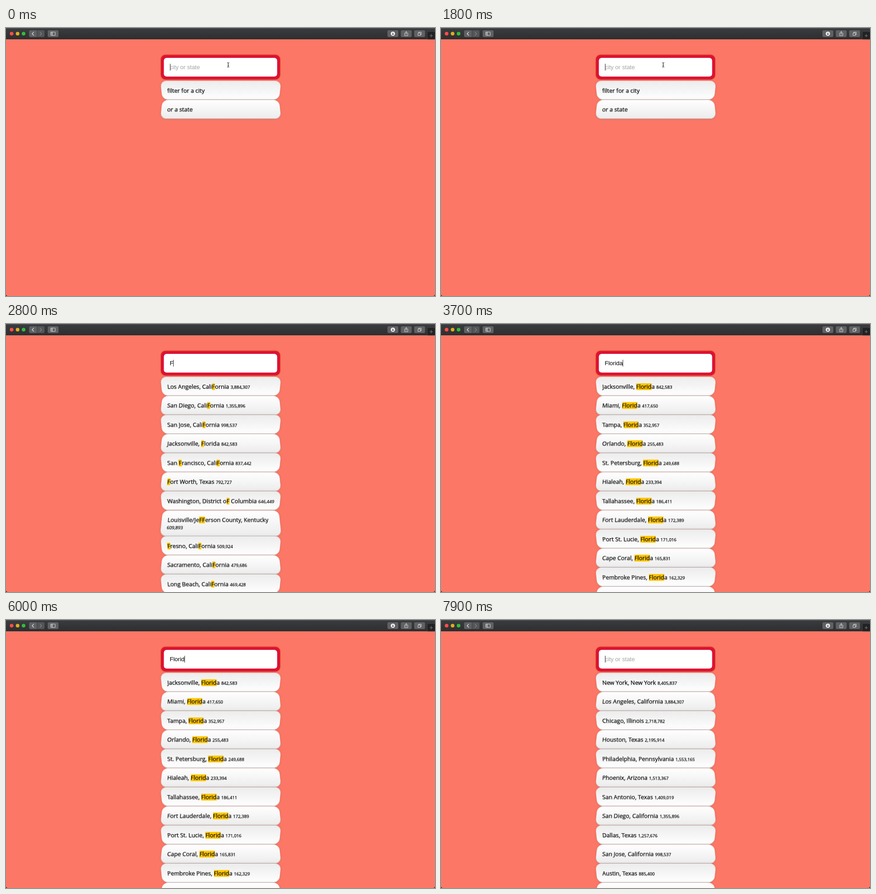
These frames come from a looping animation (947x592 px, 8 s). An HTML page:

```html
<!DOCTYPE html>
<html lang="en">
<head>
<meta charset="utf-8">
<title>City filter</title>
<style>
  html, body { margin: 0; width: 100%; height: 100%; overflow: hidden; background: #000; }
  #stage { position: relative; width: 947px; height: 592px; overflow: hidden; background: #fc7766; border-radius: 0 0 4px 4px; }
  #bar, #mouse { position: absolute; left: 0; top: 0; z-index: 2; }
  #box { position: absolute; left: 0; top: 0; }
  #field {
    position: absolute; left: 348.5px; top: 66px; width: 250px; height: 41px;
    font: 13px/42px "Liberation Sans", Arial, sans-serif; white-space: pre;
  }
  #text { position: absolute; left: 13px; top: 0; }
  #text.empty { color: #a3a3a3; }
  #caret { position: absolute; top: 13px; width: 1px; height: 15px; background: #222; }
  #list { position: absolute; left: 342.6px; top: 115px; margin: 0; padding: 0; list-style: none; }
  #list li {
    position: absolute; left: 0; top: 0; width: 262px; box-sizing: border-box; padding: 13px;
    border-radius: 13px; font: 500 12.8px/16px "Open Sans", "Noto Sans", sans-serif;
    white-space: nowrap; color: #000; -webkit-text-stroke: .25px #000;
    box-shadow: inset 0 -.7px #999, 0 0 6px rgba(0, 0, 0, .1);
  }
  #list small { font-size: 9.6px; line-height: 1px; }
  #list mark { color: inherit; background: linear-gradient(#ffc600, #ffc600) center / 100% 15px no-repeat; }
</style>
</head>
<body>
<div id="stage">
  <svg id="bar" width="947" height="26" fill="none" stroke-linecap="round" stroke-linejoin="round">
    <defs>
      <linearGradient id="metal" x2="0" y2="1">
        <stop stop-color="#3b3c3f"/><stop offset="1" stop-color="#2d2e30"/>
      </linearGradient>
    </defs>
    <rect width="947" height="25" fill="url(#metal)"/>
    <rect width="947" height="1" fill="#5b5c5e"/>
    <circle cx="12.4" cy="12.6" r="4" fill="#fb4f49"/>
    <circle cx="25.6" cy="12.6" r="4" fill="#deae22"/>
    <circle cx="38.8" cy="12.6" r="4" fill="#2fbe3c"/>
    <g fill="#606163">
      <path d="M54 5H68V20H54a3 3 0 0 1-3-3V8a3 3 0 0 1 3-3Z"/>
      <path d="M68.7 5H82a3 3 0 0 1 3 3v9a3 3 0 0 1-3 3H68.7Z" fill="#545557"/>
      <rect x="92" y="5" width="24" height="15" rx="3"/>
      <rect x="842" y="5" width="24" height="15" rx="3"/>
      <rect x="871.5" y="5" width="24" height="15" rx="3"/>
      <rect x="901" y="5" width="24" height="15" rx="3"/>
    </g>
    <path d="M61 9.2L57.6 12.6L61 16" stroke="#f2f2f2" stroke-width="1.2"/>
    <path d="M75.2 9.2L78.6 12.6L75.2 16" stroke="#8b8c8e" stroke-width="1.1"/>
    <g stroke="#e4e4e4" stroke-width=".9">
      <rect x="98.8" y="9" width="10" height="7.4" rx=".8"/>
      <path d="M102.3 9V16.4M100.1 10.8h.9M100.1 12.4h.9M100.1 14h.9"/>
      <path d="M882 11.2H880V17H887V11.2H885M883.5 14V8M881.7 9.6L883.5 7.8L885.3 9.6"/>
      <path d="M911.2 9.2H916.6V14.4M911.2 9.2V11H909.4V16.4H914.8V14.4H916.6M911.2 11H914.8V14.4"/>
    </g>
    <circle cx="854" cy="12.6" r="4.7" fill="#f4f4f4"/>
    <path d="M854 10.2V14.6M852.3 13.1L854 14.9L855.7 13.1" stroke="#4b4c4e" stroke-width="1.1"/>
    <rect x="930.5" y="8" width="17" height="17" fill="#202123" stroke="#444547" stroke-width=".8"/>
    <path d="M935.5 17H942M938.7 13.7V20.3" stroke="#87888a" stroke-width=".9"/>
  </svg>
  <svg id="box" width="947" height="130">
    <rect id="ring" x="341.4" y="58.9" width="264.2" height="55.2" rx="10.5" fill="none" stroke="#e8622f" stroke-width="1.6"/>
    <rect x="342" y="59.5" width="263" height="54" rx="10" fill="#dc1235"/>
    <rect x="348.5" y="66" width="250" height="41.2" rx="6" fill="#fff"/>
  </svg>
  <div id="field"><span id="text"></span><i id="caret"></i></div>
  <ul id="list"></ul>
  <svg id="mouse" width="24" height="24" viewBox="-8 -8 24 24">
    <path id="arrow" d="M0 0V10L2.3 8L3.8 11.4L5.5 10.6L4 7.4H7Z" fill="#000" stroke="#fff" stroke-width=".9"/>
    <path id="beam" d="M-2.3 -5Q0 -5 0 -3.5Q0 -5 2.3 -5M0 -3.5V3.5M-2.3 5Q0 5 0 3.5Q0 5 2.3 5M-1.2 1H1.2" fill="none" stroke="#111" stroke-width="1"/>
  </svg>
</div>
<script>
const $ = id => document.getElementById(id);
const LOOP = 8000, LAG = 100, WORD = 'Florida';
const TYPE = 2650, ERASE = 5850;

const parse = (s, state = '') => s.split('; ').map(r => {
  const cut = r.lastIndexOf(' ');
  return [r.slice(0, cut) + state, r.slice(cut + 1)];
});
const all = parse('New York, New York 8,405,837; Los Angeles, California 3,884,307; Chicago, Illinois 2,718,782; ' +
  'Houston, Texas 2,195,914; Philadelphia, Pennsylvania 1,553,165; Phoenix, Arizona 1,513,367; ' +
  'San Antonio, Texas 1,409,019; San Diego, California 1,355,896; Dallas, Texas 1,257,676; ' +
  'San Jose, California 998,537; Austin, Texas 885,400; Indianapolis, Indiana 843,393');
const withF = parse('Los Angeles, California 3,884,307; San Diego, California 1,355,896; San Jose, California 998,537; ' +
  'Jacksonville, Florida 842,583; San Francisco, California 837,442; Fort Worth, Texas 792,727; ' +
  'Washington, District of Columbia 646,449; Louisville/Jefferson County, Kentucky 609,893; ' +
  'Fresno, California 509,924; Sacramento, California 479,686; Long Beach, California 469,428');
const florida = parse('Jacksonville 842,583; Miami 417,650; Tampa 352,957; Orlando 255,483; St. Petersburg 249,688; ' +
  'Hialeah 233,394; Tallahassee 186,411; Fort Lauderdale 172,389; Port St. Lucie 171,016; ' +
  'Cape Coral 165,831; Pembroke Pines 162,329; Hollywood 146,526', ', Florida');
const hints = [['filter for a city'], ['or a state']];

// number of letters in the field at time t
function typed(t) {
  if (t < TYPE) return 0;
  if (t < ERASE) return Math.min(7, 1 + Math.floor((t - TYPE) / 166));
  return Math.max(0, 6 - Math.floor((t - ERASE) / 280));
}

function rowsFor(t) {
  const n = typed(t - LAG);
  if (!n) return t < ERASE ? hints : all;
  return n === 1 ? withF : florida;
}

function drawList(rows, query) {
  let y = 0;
  $('list').innerHTML = rows.map(([name, count], i) => {
    const tall = name.length > 35, odd = i % 2 === 0, height = tall ? 57 : 42;
    const label = query ? name.replace(new RegExp(query, 'gi'), `<mark>${query}</mark>`) : name;
    const number = count ? `${tall ? '<br>' : ' '}<small>${count}</small>` : '';
    const style = `height:${height}px;` +
      `background:linear-gradient(${odd ? '#ececec,#fff' : '#fff,#ececec'});` +
      `transform:translateY(${(y + (odd ? 2 : 1.35)).toFixed(2)}px) perspective(65px) rotateX(${odd ? -3 : 3}deg)`;
    y += height + .13;
    return `<li style="${style}">${label}${number}</li>`;
  }).join('');
}

const ease = (t, a, b) => {
  const p = Math.min(1, Math.max(0, (t - a) / (b - a)));
  return p * p * (3 - 2 * p);
};

function drawMouse(t) {
  const p = ease(t, 150, 800) - ease(t, 1100, 1700);
  const x = 490.5 + 36.5 * p, y = 81.5 + 275.5 * p;
  const inside = y < 113;
  $('mouse').style.display = t < TYPE ? '' : 'none';
  $('mouse').style.transform = `translate(${x - 8}px,${y - 8}px)`;
  $('beam').style.display = inside ? '' : 'none';
  $('arrow').style.display = inside ? 'none' : '';
}

const focused = t => t < 850 || t >= 1800;

// the caret blinks while idle and stays on during typing
function caretOn(t) {
  if (!focused(t)) return false;
  const typingEnd = TYPE + 1000;
  const since = t < 850 ? 0 : t < TYPE ? 1800 : t < typingEnd ? t : t < ERASE ? typingEnd : t;
  return (t - since) % 1000 < 500;
}

let last = '';
function frame(now) {
  const t = now % LOOP;
  const value = WORD.slice(0, typed(t)), query = WORD.slice(0, typed(t - LAG));
  const rows = rowsFor(t), key = value + '|' + query + '|' + rows[0][0];
  if (key !== last) {
    last = key;
    drawList(rows, query);
    $('text').textContent = value || 'city or state';
    $('text').className = value ? '' : 'empty';
    $('caret').style.left = 13 + (value ? $('text').getBoundingClientRect().width : 0) + 'px';
  }
  $('ring').style.visibility = focused(t) ? 'visible' : 'hidden';
  $('caret').style.visibility = caretOn(t) ? 'visible' : 'hidden';
  drawMouse(t);
  requestAnimationFrame(frame);
}
requestAnimationFrame(frame);
</script>
</body>
</html>
```
